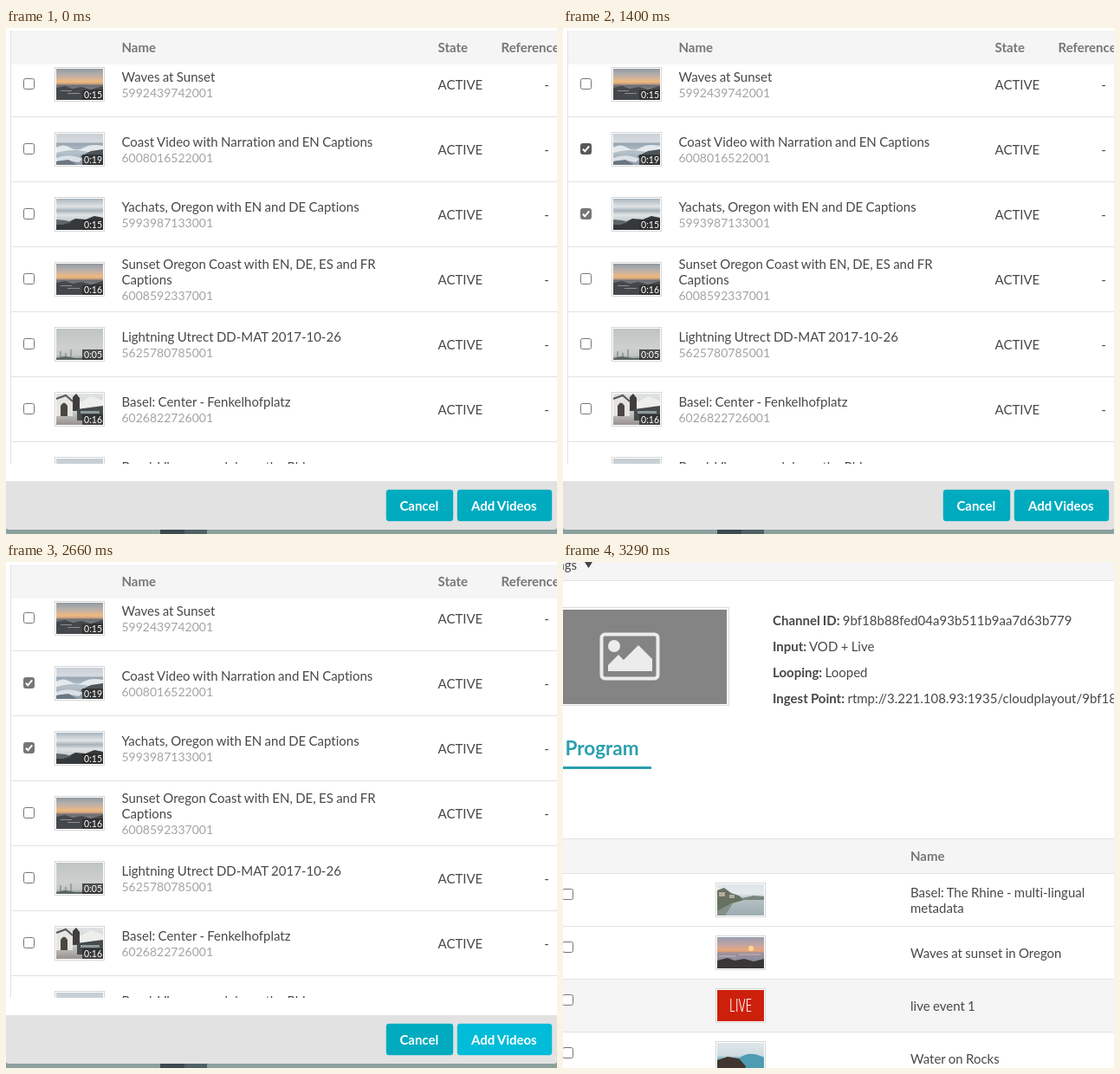
Write an HTML page that moves like this. It is 636 px wide and 584 px high and loops after 3.5 s.

```html
<!DOCTYPE html>
<html lang="en">
<head>
<meta charset="utf-8">
<title>Add videos</title>
<style>
  html, body { margin: 0; width: 100%; height: 100%; overflow: hidden; background: #fff; }
  svg { display: block; font: 15px Lato, sans-serif; word-spacing: -.5px; font-variant-ligatures: none; }
  .b { font-weight: 700; }
</style>
</head>
<body>
<svg id="stage" width="636" height="584" viewBox="0 0 636 584"></svg>
<script>
const LOOP = 3500, STEP = 70;
const stage = document.getElementById('stage');

const rect = (x, y, w, h, fill, more = '') =>
  `<rect x="${x}" y="${y}" width="${w}" height="${h}" fill="${fill}" ${more}/>`;
const text = (x, y, s, fill = '#484848', more = '') =>
  `<text x="${x}" y="${y}" fill="${fill}" ${more}>${s}</text>`;
const path = (d, fill, more = '') => `<path d="${d}" fill="${fill}" ${more}/>`;
const rule = (y, x = 0) => rect(x, y, 636 - x, 1, '#e2e2e2');

// Each photo is a vertical gradient with a few shapes on a 54 x 36 area.
const photos = {
  sunset: {
    sky: ['#929aa2', '#b3aeac 18%', '#d6b396 32%', '#f0ba7c 42%', '#cda383 48%', '#6c6e72 54%', '#85888a 72%', '#55575a'],
    art: path('M0 22L10 20 19 23 29 21 40 24 54 20V36H0Z', '#44474b') +
      path('M5 25.5H18M13 28.5H27M30 24.5H42', 'none', 'stroke="#8d8f90"')
  },
  coast: {
    sky: ['#c9cfd6', '#d6dbe0 26%', '#98a6b2 32%', '#b6c2cb 60%', '#8d9aa5'],
    art: path('M0 16Q8 11 16 16T32 16 54 14V18Q44 23 31 20T0 22Z', '#e4e9ed') +
      path('M0 28Q14 22 30 29L26 33Q10 29 0 32Z', '#dbe2e7') +
      path('M28 26L40 20 54 18V36H36Z', '#4d555c') + path('M0 32L14 30 24 36H0Z', '#6b7680')
  },
  bay: {
    sky: ['#a9b4be', '#e2e5e7 25%', '#a6b1ba 38%', '#e0e3e4 52%', '#9ba5ac'],
    art: path('M0 30L12 28 22 23 34 24 44 20 54 22V36H0Z', '#35393b') +
      path('M0 24L10 25 18 27 8 30H0Z', '#5d666b')
  },
  storm: {
    sky: ['#bfc4c3', '#cdd0cd 60%', '#c2c7c5 85%', '#8c938f'],
    art: path('M5 36V26M11 36V28M17 36V24', 'none', 'stroke="#6f7776"') +
      path('M0 34L10 32 22 34 54 33V36H0Z', '#5b6562')
  },
  square: {
    sky: ['#dfe2e4', '#d3d3d2 50%', '#98928e'],
    art: path('M0 6L11 2 19 9V26H0Z', '#e6e4e1') + path('M0 6L11 2 19 9', 'none', 'stroke="#5b5654" stroke-width="2"') +
      path('M5 26V14Q9 7 13 14V26Z', '#4a4644') + path('M19 4L23 0 27 5V20H19Z', '#3f3d3d') +
      path('M27 10L40 3 54 8V20H27Z', '#eeeeec') +
      path('M24 18L54 14V31H24Z', '#454a4b') + rect(28, 20, 22, 3, '#8f999a')
  },
  haze: { sky: ['#c6cfd3', '#d8dddf'], art: '' },
  river: {
    sky: ['#dce4e8', '#e5eaec 30%', '#b5c1c5 45%', '#9dacb0'],
    art: path('M0 7L8 4 16 10 25 13 31 18 17 22 0 31Z', '#667161') +
      path('M2 9H9V14H2ZM14 12H20V16H14Z', '#b4aca0') +
      path('M29 16L42 13 54 14V18H29Z', '#78857f') + path('M0 31L18 22 9 36H0Z', '#858e88')
  },
  dusk: {
    sky: ['#969caf', '#c9a6a0 28%', '#eca674 44%', '#a2909a 50%', '#8a8e9e 75%', '#555560'],
    art: '<circle cx="39" cy="13" r="3" fill="#ffd98a"/>' +
      path('M0 27L12 24 20 27 31 25 42 28 54 25V36H0Z', '#393638') +
      path('M2 22H22M25 20H50', 'none', 'stroke="#bdb7c0"')
  },
  live: {
    sky: ['#cd200c', '#cd200c'],
    art: text(27, 25, 'LIVE', '#fff',
      'text-anchor="middle" style="font:300 20px \'Open Sans\',sans-serif;font-stretch:condensed"')
  },
  rocks: {
    sky: ['#dde6ea', '#cfdce2 40%', '#66a1b5 55%', '#3c8198'],
    art: path('M25 18Q37 8 54 17V36H25Z', '#4d9cb2') +
      path('M0 20L12 16 25 18 33 27 30 36H0Z', '#40352f')
  }
};

const gradients = Object.entries(photos).map(([name, { sky }]) =>
  `<linearGradient id="${name}" x2="0" y2="1">` + sky.map((s, i) => {
    const [color, at] = s.split(' ');
    return `<stop stop-color="${color}" offset="${at || (i ? '100%' : '0%')}"/>`;
  }).join('') + '</linearGradient>').join('');

function thumb(x, y, name, length) {
  const badge = length ? rect(30, 24, 24, 12, '#2d2d2d', 'opacity=".8"') +
    text(53, 33.8, length, '#fff', 'font-size="10.5" text-anchor="end"') : '';
  return `<g transform="translate(${x} ${y})">` +
    rect(-1.5, -1.5, 57, 39, '#fff', 'stroke="#d6d6d6"') +
    rect(0, 0, 54, 36, `url(#${name})`) + photos[name].art + badge + '</g>';
}

const checkbox = (x, y, id = '') =>
  `<g transform="translate(${x} ${y})" ${id && `id="${id}"`}>` +
  rect(-6, -6, 12, 12, '#fff', 'rx="2" stroke="#767676"') +
  path('M-3.6 .2L-1.2 2.8 3.7-3.2', 'none', 'stroke="#fff" stroke-width="2" visibility="hidden"') + '</g>';

const videos = [
  ['sunset', '0:15', '5992439742001', 'Waves at Sunset'],
  ['coast', '0:19', '6008016522001', 'Coast Video with Narration and EN Captions'],
  ['bay', '0:15', '5993987133001', 'Yachats, Oregon with EN and DE Captions'],
  ['sunset', '0:16', '6008592337001', 'Sunset Oregon Coast with EN, DE, ES and FR', 'Captions'],
  ['storm', '0:05', '5625780785001', 'Lightning Utrect DD-MAT 2017-10-26'],
  ['square', '0:16', '6026822726001', 'Basel: Center - Fenkelhofplatz'],
  ['haze', '0:20', '6026822731001', 'Basel: View up and down the Rhine']
];

function videoRow([photo, length, id, ...lines], i) {
  const y = i * 75, top = y + 62 - (lines.length - 1) * 9;
  return checkbox(26.5, y + 64.5, 'check' + i) + thumb(58, y + 47, photo, length) +
    lines.map((s, n) => text(133.5, top + n * 18, s)).join('') +
    text(133.5, top + lines.length * 18, id, '#a3a3a3', 'font-size="14"') +
    text(498.5, y + 71, 'ACTIVE') + text(624, y + 71, '-', '#484848', 'text-anchor="middle"') +
    rule(y + 102, 6);
}

const button = (id, x, w, label) => `<g id="${id}">` +
  rect(x, 533, w, 36, '#00abc0', 'rx="3" stroke="#00abc0" stroke-opacity=".4"') +
  text(x + w / 2 - .7, 557, label, '#fff', 'class="b" text-anchor="middle"') + '</g>';

const head = (x, y, s) => text(x, y, s, '#777', 'class="b"');

const dialog = rect(0, 0, 636, 584, '#fff') +
  `<g clip-path="url(#list)">${videos.map(videoRow).join('')}</g>` +
  rect(6, 3, 630, 39, '#f5f5f5') + rect(5, 3, 1, 500, '#e2e2e2') +
  head(133.5, 28, 'Name') + head(498.5, 28, 'State') + head(571.5, 28, 'Reference ID') +
  rect(0, 570, 636, 14, '#8ca09d') + rect(178, 578, 28, 6, '#3c494e') + rect(206, 578, 26, 6, '#506166') +
  path('M0 523H636V576Q636 579 633 579H3Q0 579 0 576Z', '#e2e2e2') +
  button('cancel', 439, 77, 'Cancel') + button('add', 521, 109, 'Add Videos');

const channel = '9bf18b88fed04a93b511b9aa7d63b779';
const details = [['Channel ID', channel], ['Input', 'VOD + Live'], ['Looping', 'Looped'],
  ['Ingest Point', 'rtmp://3.221.108.93:1935/cloudplayout/' + channel]];
const program = [['river', 'Basel: The Rhine - multi-lingual', 'metadata'],
  ['dusk', 'Waves at sunset in Oregon'], ['live', 'live event 1'], ['rocks', 'Water on Rocks']];

const page = rect(0, 0, 636, 584, '#fff') +
  rect(0, 0, 636, 21, '#f5f5f5') + rule(21) +
  text(16, 8.5, 'Tags', '#444', 'text-anchor="end"') + path('M25 0H34L29.5 7Z', '#444') +
  rect(-9.5, 52.5, 201, 113, '#fff', 'stroke="#dcdcdc"') + rect(-8, 55, 197, 109, '#848484') +
  rect(44.5, 83.5, 65, 51, 'none', 'rx="4" stroke="#ececec" stroke-width="4"') +
  '<circle cx="59" cy="97" r="7" fill="#ececec"/>' +
  path('M52 126V119L64 107 70 113 87 96 103 112V126Z', '#ececec') +
  details.map(([k, v], i) => text(242, 73 + i * 30, `<tspan class="b">${k}:</tspan> ${v}`)).join('') +
  text(2.5, 223, 'Program', '#2a9fae', 'class="b" font-size="22.5"') + rect(0, 236, 102, 3, '#2a9fae') +
  rect(0, 319, 636, 40, '#f5f5f5') + rule(319) + rule(359) + head(401, 345, 'Name') +
  program.map(([photo, ...lines], i) => {
    const y = i * 61;
    return (i === 2 ? rect(0, y + 360, 636, 60, '#f5f5f5') : '') + rule(y + 420) +
      checkbox(5.5, y + 383.5) + thumb(178, y + 372, photo) +
      lines.map((s, n) => text(401, y + 396 - (lines.length - 1) * 9 + n * 18, s)).join('');
  }).join('');

stage.innerHTML = `<defs>${gradients}<clipPath id="list">${rect(0, 42, 636, 461, '#000')}</clipPath></defs>` +
  `<g id="dialog">${dialog}</g><g id="page">${page}</g>`;

const el = id => document.getElementById(id);

// Takes the hover, press, tick, release and leave times of one checkbox.
function drawCheck(id, t, [hover, press, tick, release, leave]) {
  const on = t >= tick;
  const color = t < hover || t >= leave ? '#767676' : t < press || t >= release ? '#585858' : '#8a8a8a';
  const [box, mark] = el(id).children;
  box.setAttribute('stroke', color);
  box.setAttribute('fill', on ? color : '#fff');
  mark.setAttribute('visibility', on ? 'inherit' : 'hidden');
}

function draw(time) {
  const t = Math.floor(time % LOOP / STEP) * STEP;
  el('dialog').style.display = t < 2940 ? '' : 'none';
  el('page').style.display = t < 2940 ? 'none' : '';
  drawCheck('check2', t, [70, 280, 350, 420, 630]);
  drawCheck('check1', t, [700, 1190, 1260, 1400, 1610]);
  const glow = Math.min(1, Math.max(0, (t - 2100) / 210));
  const color = `rgb(0 ${171 + 17 * glow} ${192 + 24 * glow})`;
  el('add').firstChild.setAttribute('fill', color);
  el('add').firstChild.setAttribute('stroke', color);
  el('add').setAttribute('transform', `translate(0 ${t >= 2800 ? 1 : 0})`);
}

const start = performance.now();
function tick() {
  draw(performance.now() - start);
  requestAnimationFrame(tick);
}
tick();
</script>
</body>
</html>
```
